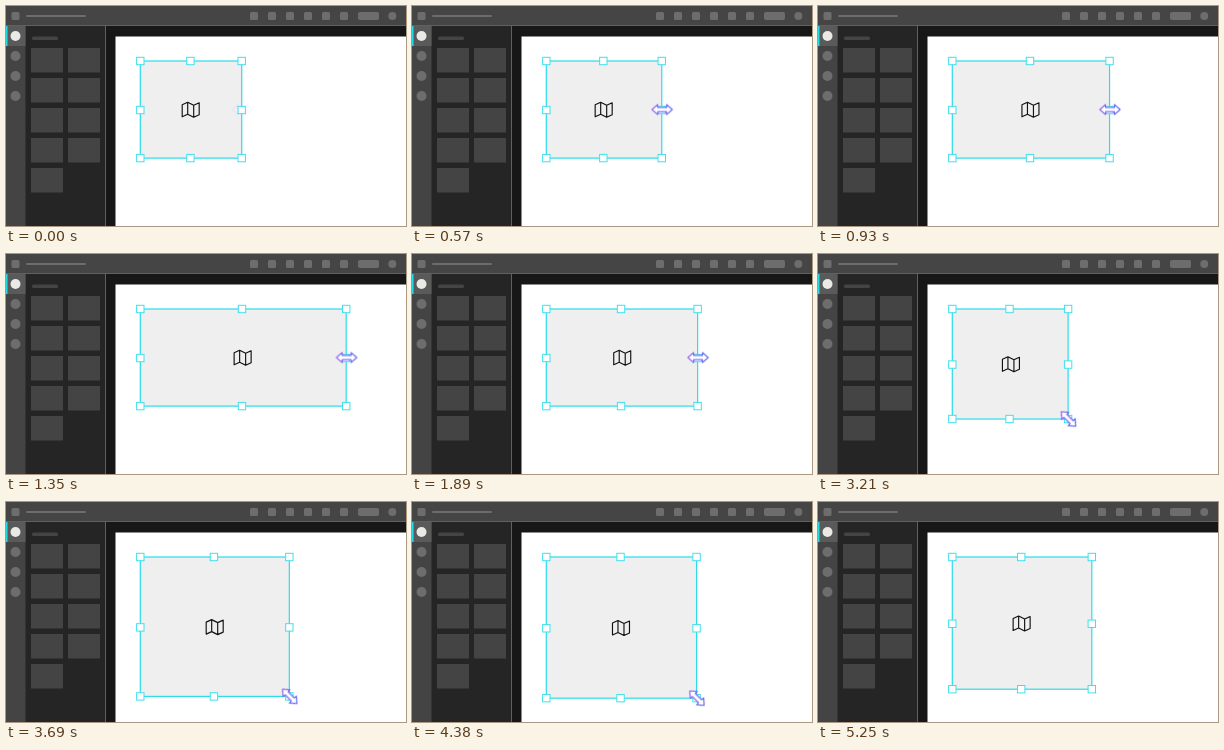
Animation of 400x220 px, one loop 6300 ms. Source, as an HTML page:

```html
<!DOCTYPE html>
<html lang="en">
<head>
<meta charset="utf-8">
<title>Resize handles</title>
<style>
  @property --w { syntax: "<length>"; inherits: true; initial-value: 101.4px; }
  @property --h { syntax: "<length>"; inherits: true; initial-value: 97.1px; }
  @property --lag { syntax: "<length>"; inherits: true; initial-value: 0px; }
  @property --grip { syntax: "<number>"; inherits: true; initial-value: 0.5; }

  html, body { margin: 0; width: 100%; height: 100%; overflow: hidden; background: #171717; }
  svg { display: block; width: 400px; height: 220px; }

  .stage { animation: size 6.3s linear infinite, grip 6.3s linear infinite; }
  .frame { width: var(--w); height: var(--h); fill: #efefef; stroke: #2bdcea; stroke-width: 1.2; }
  .handle {
    fill: #fff; stroke: #3fe0ed; stroke-width: 1;
    transform: translate(calc(var(--w) * var(--x)), calc(var(--h) * var(--y)));
  }
  .map {
    fill: none; stroke: #111; stroke-width: 1.15; stroke-linejoin: round;
    transform: translate(calc(var(--w) * .497 + var(--lag)), calc(var(--h) * .503));
  }
  .cursor {
    fill: #fff; stroke: url(#tint); stroke-width: 1.1; stroke-linejoin: round;
    transform: translate(calc(var(--w) + .4px), calc(var(--h) * var(--grip))) rotate(calc((var(--grip) - .5) * 90deg));
    animation: fade 6.3s linear infinite;
  }

  @keyframes size {
    0%, 7.143% { --w: 101.4px; --h: 97.1px; --lag: 0px; }
    21.429%, 23.81% { --w: 205.9px; --h: 97.1px; --lag: 0px; }
    35.714%, 47.619% { --w: 101.2px; --h: 97.1px; --lag: 1.4px; }
    61.905%, 64.286% { --w: 163.5px; --h: 152.2px; --lag: 0px; }
    73.81%, 100% { --w: 139.5px; --h: 132.2px; --lag: 0px; }
  }
  @keyframes grip {
    0%, 38.095% { --grip: 0.5; }
    42.857%, 100% { --grip: 1; }
  }
  @keyframes fade {
    0% { opacity: 0; }
    4.762%, 78.571% { opacity: 1; }
    83.333%, 100% { opacity: 0; }
  }
</style>
</head>
<body>
<svg class="stage" viewBox="0 0 400 220">
  <defs>
    <linearGradient id="tint" gradientUnits="userSpaceOnUse" x1="-10" x2="10" y1="0" y2="0">
      <stop stop-color="#9466ee"/>
      <stop offset="1" stop-color="#5f6df0"/>
    </linearGradient>
  </defs>

  <rect width="400" height="220" fill="#171717"/>
  <rect x="109.5" y="30.5" width="291" height="190" fill="#fff"/>
  <rect x="19" y="20" width="80" height="200" fill="#252525"/>
  <rect x="99" y="20" width="1" height="200" fill="#606060"/>
  <rect y="20" width="19.5" height="200" fill="#444"/>
  <rect width="400" height="19" fill="#454545"/>
  <rect y="19" width="400" height="1" fill="#606060"/>

  <g fill="#6d6d6d">
    <rect x="5.5" y="6" width="8" height="8" rx="1.5"/>
    <rect x="20" y="9" width="60" height="2" rx="1"/>
    <g id="tools"></g>
    <rect x="352" y="6" width="21" height="8" rx="2"/>
    <circle cx="386.3" cy="10" r="4"/>
    <circle cx="9.5" cy="50" r="5"/>
    <circle cx="9.5" cy="70" r="5"/>
    <circle cx="9.5" cy="90" r="5"/>
  </g>
  <rect y="20" width="19.5" height="20" fill="#5a5a5a"/>
  <rect y="20" width="1.5" height="20" fill="#22dbe9"/>
  <circle cx="9.5" cy="30" r="5" fill="#ebe9e6"/>
  <g fill="#444">
    <rect x="26" y="30.5" width="26" height="3.5" rx="1.5"/>
    <g id="tiles"></g>
  </g>

  <g transform="translate(134.3 55)">
    <rect class="frame"/>
    <path class="map" d="M-8.5-5L-3-7.5L3-4.5L8.5-7V5L3 7.5L-3 4.5L-8.5 7ZM-3-7.5V4.5M3-4.5V7.5"/>
    <g id="handles"></g>
    <path class="cursor" d="M-10.2 0L-4.4-5V-2.1H4.4V-5L10.2 0L4.4 5V2.1H-4.4V5Z"/>
  </g>
</svg>
<script>
  const addRect = (parent, attrs) => {
    const rect = document.createElementNS("http://www.w3.org/2000/svg", "rect");
    for (const [name, value] of Object.entries(attrs)) rect.setAttribute(name, value);
    document.getElementById(parent).append(rect);
  };

  for (let i = 0; i < 6; i++)
    addRect("tools", { x: 244 + 18 * i, y: 6, width: 8, height: 8, rx: 1.5 });

  for (let i = 0; i < 9; i++)
    addRect("tiles", { x: 25 + 37 * (i % 2), y: 42 + 30 * Math.floor(i / 2), width: 32, height: 24.5 });

  const midX = 0.494, midY = 0.505;
  for (const x of [0, midX, 1])
    for (const y of [0, midY, 1])
      if (x !== midX || y !== midY)
        addRect("handles", { class: "handle", x: -3.7, y: -3.7, width: 7.4, height: 7.4, style: `--x:${x};--y:${y}` });
</script>
</body>
</html>
```
